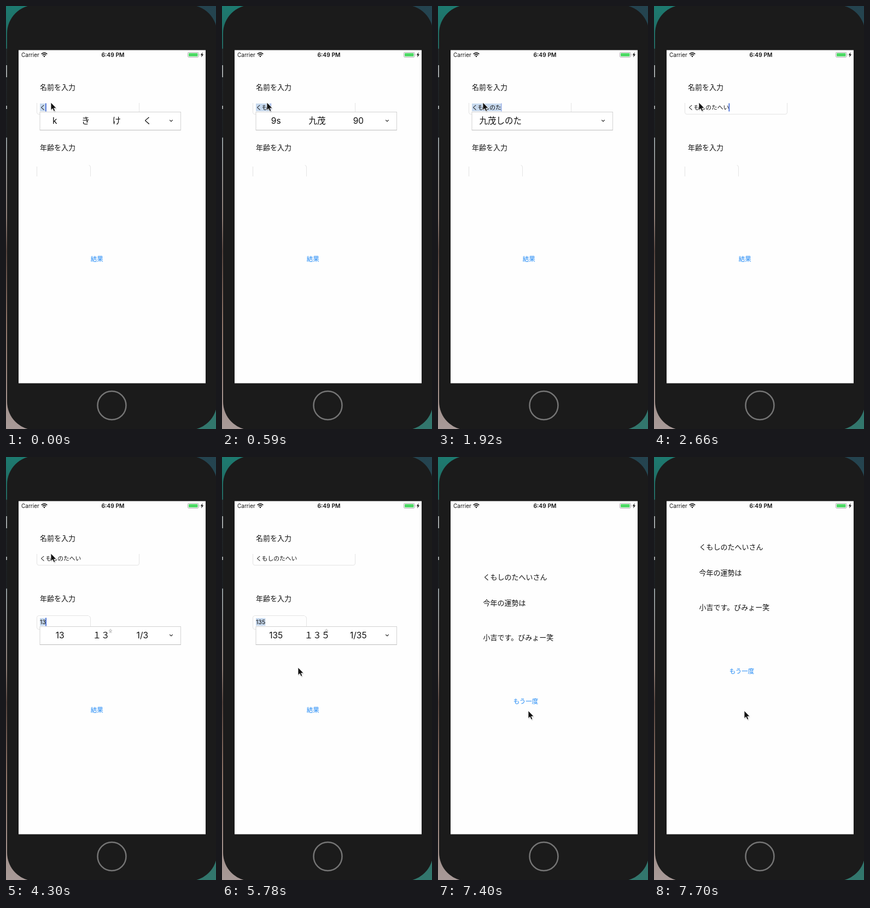
Animation of 384x772 px, one loop 8000 ms. Source, as an HTML page:

```html
<!DOCTYPE html>
<html lang="ja">
<head>
<meta charset="utf-8">
<style>
  html, body { margin: 0; width: 100%; height: 100%; overflow: hidden; background: #1b1b1b; }
  svg { display: block; width: 384px; height: 772px; font-family: Inter, "Noto Sans CJK JP", "Noto Sans CJK", sans-serif; fill: #111; }
  .label { font-size: 13px; }
  .field { font-size: 10.75px; }
  .button { font-size: 11.5px; fill: #1e88f5; }
  #bar text { font-size: 15.5px; }
  #bar .note { font-size: 7px; fill: #999; }
  .line { fill: none; stroke: #e4e4e4; }
  .mark { fill: #c7d9ee; }
  .caret { fill: #4068d4; }
</style>
</head>
<body>
<svg viewBox="0 0 384 772">
  <defs>
    <linearGradient id="edge" x2="0" y2="1">
      <stop offset="0" stop-color="#1d7a70"/><stop offset=".1" stop-color="#24665f"/>
      <stop offset=".102" stop-color="#23282a"/><stop offset=".31" stop-color="#1c1f22"/>
      <stop offset=".312" stop-color="#8d9699"/><stop offset=".5" stop-color="#8a7b74"/>
      <stop offset=".58" stop-color="#55443e"/><stop offset=".75" stop-color="#8d7468"/>
      <stop offset="1" stop-color="#a89a98"/>
    </linearGradient>
    <linearGradient id="side" x2="0" y2="1">
      <stop offset="0" stop-color="#24434f"/><stop offset="1" stop-color="#32776d"/>
    </linearGradient>
    <clipPath id="screen"><rect x="23" y="81" width="342" height="607"/></clipPath>
  </defs>

  <rect width="192" height="772" fill="url(#edge)"/>
  <rect x="192" width="192" height="772" fill="url(#side)"/>
  <path d="M0 108h2v22h-2zM0 182h2v6h-2z" fill="#9a9fa0"/>
  <rect x="2" y="-2" width="384" height="776" rx="52" fill="#1b1b1b"/>
  <circle cx="193.5" cy="729" r="26" fill="none" stroke="#757575" stroke-width="2.5"/>
  <rect x="23" y="80.5" width="342" height="608" fill="#fefefe"/>

  <g clip-path="url(#screen)">
    <text class="label" x="62" y="152.6">名前を入力</text>
    <text class="label" x="62" y="263.4">年齢を入力</text>
    <path class="line" d="M56.5 177V194q0 3.5 3.5 3.5H240q3.5 0 3.5-3.5V177"/>
    <path class="line" d="M56.5 293V311M154.5 311V294q0-3-3-3.5"/>
    <path class="line" id="ageBox" d="M56.5 293q0-3 3.5-3.5H151M56.5 311q0 3.5 3.5 3.5H151q3.5 0 3.5-3.5"/>
    <rect class="mark" id="nameMark" x="62" y="178" height="14"/>
    <text class="field" id="name" x="62" y="188.8"></text>
    <rect class="mark" id="ageMark" x="62" y="294" height="14"/>
    <text class="field" id="age" x="62" y="305.4"></text>
    <rect class="caret" id="caret" width="1.7" height="15"/>
    <text class="button" id="go" x="154.8" y="465.6">結果</text>
    <g id="bar">
      <rect x="62" y=".5" width="257.5" height="33" fill="#fff" stroke="#d2d2d2"/>
      <path d="M62 33.5H319.5" stroke="#bcbcbc"/>
      <path d="M299.3 15l2.7 2.6 2.7-2.6" fill="none" stroke="#333" stroke-width="1.2"/>
      <g id="choices"></g>
    </g>
    <g id="result">
      <rect x="23" y="81" width="342" height="607" fill="#fefefe"/>
      <text class="label" x="82.5" y="169">くもしのたへいさん</text>
      <text class="label" x="82.5" y="216.4">今年の運勢は</text>
      <text class="label" x="82.5" y="279">小吉です。びみょー笑</text>
      <text class="button" x="137.7" y="394.8">もう一度</text>
    </g>
  </g>

  <text x="28" y="92.6" font-size="10">Carrier</text>
  <text x="195.5" y="92.7" font-size="10.3" font-weight="600" text-anchor="middle">6:49 PM</text>
  <path d="M64.7 87.7q5.3-4.8 10.6 0M66.7 89.9q3.3-2.9 6.6 0" fill="none" stroke="#111" stroke-width="1.6"/>
  <path d="M68.2 91.5l1.8 1.9 1.8-1.9q-1.8-1.5-3.6 0z"/>
  <rect x="332.5" y="84.5" width="19.5" height="9" rx="2" fill="none" stroke="#999" stroke-width=".8"/>
  <rect x="334" y="86" width="16.5" height="6" rx="1" fill="#4cd964"/>
  <path d="M353 87.5q1.4 1.5 0 3z" fill="#888"/>
  <path d="M359.7 84.3l-4 5.3h2.3l-1 4.1 4.1-5.5h-2.4z"/>
  <g id="mouse">
    <path d="M1 2V16l3.2-2.8 2.2 5 2.8-1.2-2.2-4.8h4.4z" fill="#0002"/>
    <path d="M0 0V14.2l3.2-2.9 2.2 5 2.5-1.1-2.2-4.8h4.4z" stroke="#fff" stroke-width=".8"/>
  </g>
</svg>
<script>
const $ = id => document.getElementById(id);
const LOOP = 8000;

// Each track lists [start time, values...]; a value holds until the next entry.
const names = [
  [0, 'く', 'k き け く'], [150, 'くm', '9m くm 区m'], [300, 'くも', '雲 蜘蛛 9も'],
  [440, 'くも', '雲 九茂 蜘蛛'], [590, 'くもs', '9s 九茂 90'], [740, 'くもsh', '9sh 九茂 90'],
  [890, 'くもし', '九茂し 雲し 9し'], [1020, 'くもしn', '九茂 雲し 9n'], [1170, 'くもしの', '九茂 雲し 9の'],
  [1320, 'くもしのt', '九茂しのt'], [1920, 'くもしのた', '九茂しのた'], [2070, 'くもしのたh', '九茂しのたh'],
  [2210, 'くもしのたへ', '九茂しのたへ'], [2360, 'くもしのたへい', '九茂しの太平'], [2660, 'くもしのたへい', '']
];
const ages = [
  [0, '', ''], [3560, '1', ''], [3710, '1', '1 １ 一 ①'], [3850, '1', '1 １ ① 一'],
  [4150, '13', '1 １ ① 一'], [4300, '13', '13 １３ 1/3'], [4750, '135', '135 １３５ 1/35'], [6080, '135', '']
];
const carets = [[0, 1], [590, .4], [2660, 1], [5780, 0], [6080, 1], [6520, 0]];
const mice = [
  [0, 82, 176], [5050, 92, 210], [5200, 118, 310], [5340, 139, 384], [6520, 146, 410],
  [6670, 158, 445], [6810, 161, 456], [6960, 165, 463]
];
const slides = [[0, 607], [7250, 220], [7400, 55], [7550, 2], [7700, 0]];

const at = (track, t) => track.findLast(step => step[0] <= t).slice(1);

function choicesMarkup(list) {
  const words = list.split(' ');
  if (words.length === 1) return `<text x="75.5" y="22">${list}</text>`;
  const width = 226 / words.length;
  const note = /１３/.test(list) ? '<text class="note" x="187.5" y="10.5">全</text>' : '';
  return note + words.map((word, i) =>
    `<text x="${61 + width * (i + .5)}" y="22" text-anchor="middle">${word}</text>`).join('');
}

function setField(id, text, marked) {
  const el = $(id);
  el.textContent = text;
  const width = text ? el.getComputedTextLength() : 0;
  $(id + 'Mark').setAttribute('width', marked ? width : 0);
  return width;
}

function draw(t) {
  const [name, nameList] = at(names, t), [age, ageList] = at(ages, t);
  const nameWidth = setField('name', name, t < 2660);
  const ageWidth = setField('age', age, t >= 3560 && t < 6080);
  const onAge = t >= 2960, list = onAge ? ageList : nameList;

  $('caret').setAttribute('x', 61.3 + (onAge ? ageWidth : nameWidth));
  $('caret').setAttribute('y', onAge ? 293.5 : 177.5);
  $('caret').setAttribute('opacity', at(carets, t)[0]);
  $('bar').setAttribute('transform', `translate(0 ${onAge ? 309 : 193})`);
  $('bar').setAttribute('visibility', list ? 'visible' : 'hidden');
  $('choices').innerHTML = list && choicesMarkup(list);
  $('ageBox').setAttribute('visibility', t < 3560 ? 'hidden' : 'visible');
  $('go').setAttribute('opacity', t < 7110 ? 1 : .3);
  $('mouse').setAttribute('transform', `translate(${at(mice, t)})`);
  $('result').setAttribute('transform', `translate(0 ${at(slides, t)[0]})`);
}

const start = performance.now();
function tick() {
  draw((performance.now() - start) % LOOP);
  requestAnimationFrame(tick);
}
tick();
</script>
</body>
</html>
```
